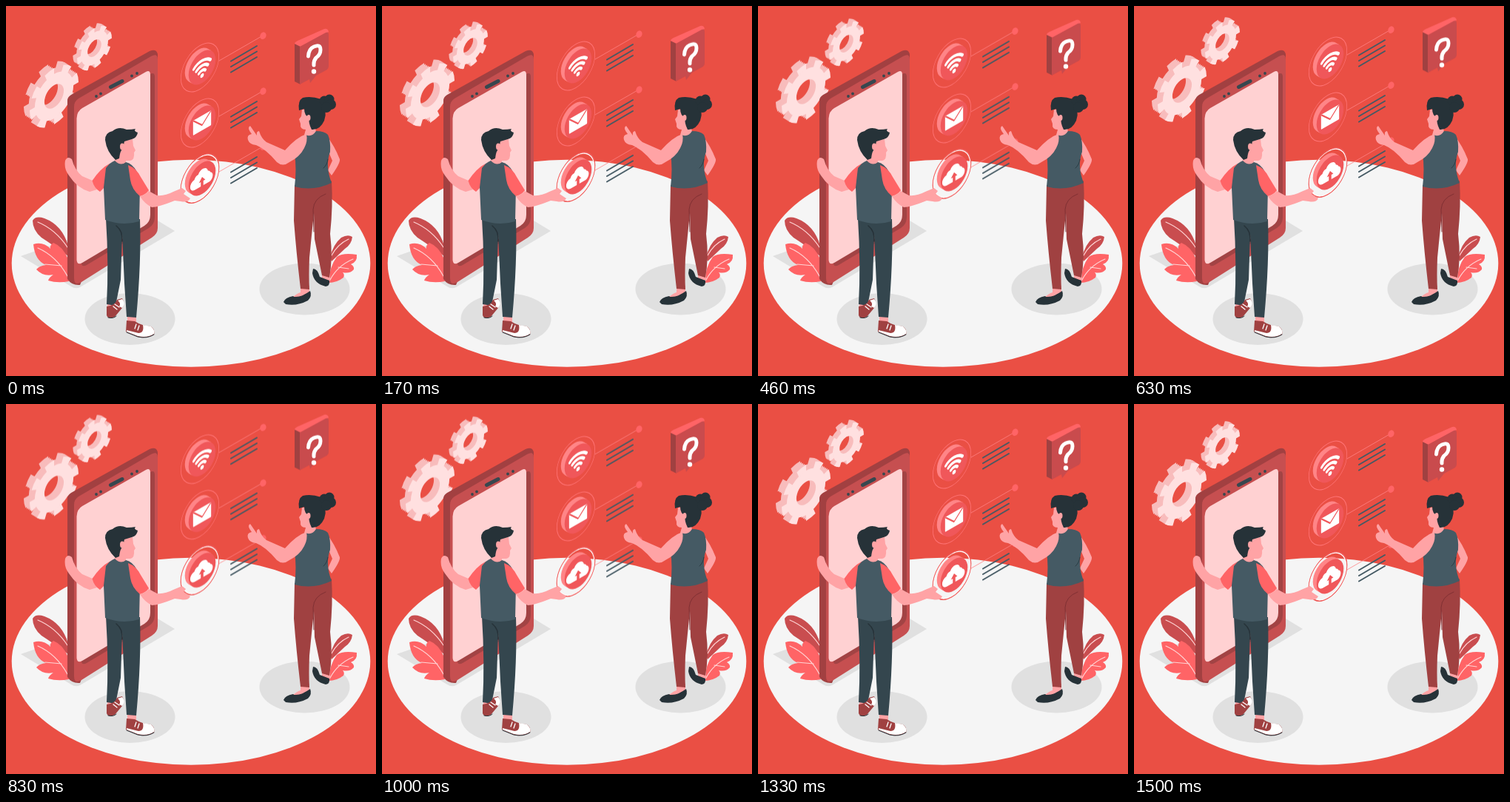
Write an HTML page without scripts that moves like this. It is 500x500 px and loops after 1.54 s.

```html
<!DOCTYPE html>
<html lang="en">
<head>
<meta charset="utf-8">
<title>Isometric app scene</title>
<style>
  html, body { margin: 0; width: 100%; height: 100%; overflow: hidden; background: #ea4f44; }
  svg { display: block; width: 100vw; height: 100vh; }

  .float { --rise: -8.7px; animation: float 1540ms linear infinite; }
  .bubble { --rise: -17px; }
  .mark { --rise: -9.5px; }
  @keyframes float {
    0%, 97.4%, 100% { transform: translateY(0); }
    11% { transform: translateY(calc(var(--rise) * .24)); }
    30% { transform: translateY(calc(var(--rise) * .72)); }
    35% { transform: translateY(calc(var(--rise) * .83)); }
    44% { transform: translateY(calc(var(--rise) * .97)); }
    49% { transform: translateY(var(--rise)); }
    54% { transform: translateY(calc(var(--rise) * .97)); }
    73.4% { transform: translateY(calc(var(--rise) * .53)); }
    86.4% { transform: translateY(calc(var(--rise) * .23)); }
  }

  .skin { fill: #ffa3a5; }
  .dark { fill: #263238; }
  .slate { fill: #455a64; }
  .coral { fill: #ff6466; }
  .maroon { fill: #a04141; }
  .leaf { fill: #c94d4f; }
  .white { fill: #fff; }
  .shadow { fill: #e0e0e0; }
  .line { fill: none; stroke-linecap: round; stroke-linejoin: round; }
  .glyph { stroke: #fff; stroke-width: 4; }
  .vein { stroke: #ffd4d4; stroke-width: 1.2; }
  .side { color: #f8bcbc; }
  .face { color: #ffe0e0; }
</style>
</head>
<body>
<svg viewBox="0 0 500 500">
  <defs>
    <g id="cog" fill="none" stroke="currentColor" transform="matrix(.87 -.5 0 1 0 0) rotate(22.5)">
      <circle r="22.5" stroke-width="15"/>
      <circle r="33.5" stroke-width="9" pathLength="16" stroke-dasharray="1 1"/>
    </g>
    <g id="gear">
      <g class="side">
        <use href="#cog" x="-8" y="-5"/>
        <use href="#cog" x="-6" y="-3.7"/>
        <use href="#cog" x="-4" y="-2.5"/>
        <use href="#cog" x="-2" y="-1.2"/>
      </g>
      <use href="#cog" class="face"/>
    </g>
    <g id="badge">
      <path class="line" stroke="#ff8587" stroke-width=".8" d="M288 74L347 40"/>
      <ellipse class="coral" cx="347.500" cy="40" rx="4" ry="5" transform="rotate(25 347 40)"/>
      <path class="line" stroke="#455a64" stroke-width="2" d="M304 74.500l35-20.500m-35 28l35-20.500m-35 28l35-20.500"/>
      <circle r="29.500" fill="none" stroke="#ff7476" stroke-width=".9" transform="matrix(.87 -.5 0 1 262 83)"/>
      <g fill="#ff8587">
        <circle r="21" transform="matrix(.87 -.5 0 1 260 80)"/>
        <circle r="21" transform="matrix(.87 -.5 0 1 262.500 81.500)"/>
      </g>
      <circle r="21" fill="#f0575a" transform="matrix(.87 -.5 0 1 265 83)"/>
    </g>
    <path id="screen" d="M95.500 152Q96 142 103 138L189 89Q195 86 195 93V282Q195 292 187 297L103 347Q96 351 95.500 343Z"/>
  </defs>

  <rect width="500" height="500" fill="#ea4f44"/>
  <ellipse cx="250" cy="347.800" rx="242.300" ry="140" fill="#f5f5f5"/>
  <path class="shadow" d="M20 338L83 316L205 290L228 304L100 380Q94 383 88 379Z"/>
  <ellipse class="shadow" cx="167.500" cy="423" rx="61" ry="35"/>
  <ellipse class="shadow" cx="403.500" cy="382.500" rx="61" ry="35"/>

  <g class="float">
    <use href="#gear" transform="translate(65 122)"/>
    <use href="#gear" transform="translate(119.500 57) scale(.71)"/>
  </g>

  <!-- Plants -->
  <path class="leaf" d="M84 338Q62 322 48 313Q36 303 36 290Q40 283 52 287Q76 296 84 324Z"/>
  <path class="coral" d="M84 362L85 372Q70 375 57 371Q58 367 64 363Q50 366 41 356Q45 351 54 350Q39 344 37 322Q50 318 60 328Q59 323 64 320Q77 325 84 342Z"/>
  <path class="line vein" d="M43 292Q67 302 83 326M43 327Q68 338 83 365M53 349L75 351"/>
  <path class="leaf" d="M438 340Q442 322 453 313Q462 308 468 312Q467 322 458 328L440 345Z"/>
  <path class="coral" d="M436 374Q437 352 447 339Q455 333 474 336Q475 346 466 349Q471 352 470 356Q465 362 455 360Q458 363 456 367Q447 374 436 374Z"/>
  <path class="line vein" d="M440 337Q448 322 463 315M438 370Q448 351 469 342M449 353L463 355"/>

  <!-- Phone -->
  <path fill="#a24041" d="M83 128Q83 123 88 120L194 61Q203 57 205 65V110L100 377Q89 378 83 369Z"/>
  <path fill="#c64f50" d="M92 136Q92 129 98 125L196 68Q205 63 205 72V300Q205 308 197 313L102 373Q92 379 92 368Z"/>
  <use href="#screen" x="6" y="3" fill="#a24344"/>
  <use href="#screen" fill="#ffd1d2"/>
  <path class="line" stroke="#37474f" stroke-width="5" d="M141.500 109.500L157 101.500"/>
  <g fill="#37474f">
    <circle cx="122" cy="122" r="1.900"/><circle cx="128" cy="118.500" r="1.900"/>
    <circle cx="170" cy="94.500" r="1.900"/><circle cx="177" cy="91" r="1.900"/>
  </g>

  <!-- Floating badges -->
  <g class="float">
    <use href="#badge"/>
    <g transform="matrix(.87 -.5 0 1 265 83)">
      <path class="line glyph" d="M-13-4A19 19 0 0 1 13-4M-9 1A13 13 0 0 1 9 1M-5 6A7 7 0 0 1 5 6"/>
      <circle class="white" cy="11" r="2.800"/>
    </g>
    <use href="#badge" y="75"/>
    <g transform="matrix(.87 -.5 0 1 265 158)">
      <rect class="white" x="-14" y="-10" width="28" height="20" rx="1"/>
      <path class="line" stroke="#f0575a" stroke-width="1.800" d="M-13-9L0 3L13-9"/>
    </g>
    <use href="#badge" y="150"/>
    <g fill="none" transform="matrix(.87 -.5 0 1 262 233)">
      <circle r="28.500" stroke="#fff" stroke-width="1.200"/>
      <circle r="29.700" stroke="#ee5a58" stroke-width="1.200"/>
    </g>
    <g transform="matrix(.87 -.5 0 1 265 233)">
      <path class="white" d="M-11 10A7 7 0 0 1-12-4A6 6 0 0 1-6-8A8 8 0 0 1 9-6A6 6 0 0 1 13-2A6.500 6.500 0 0 1 12 10Z"/>
      <path fill="#f0575a" d="M0-2L5 4H2V11H-2V4H-5Z"/>
    </g>
  </g>

  <g class="float bubble">
    <path class="maroon" d="M390 51L398 54V106L390 102Z"/>
    <path class="coral" d="M390 51Q390 49 394 47L430 31Q435 30 436 35L398 55Z"/>
    <path fill="#c94b4d" d="M397 55L432 36Q436 34 436 39V81Q436 85 432 87L419 94L411 104L410 99L397 106Z"/>
  </g>
  <g class="float mark">
    <path class="line" stroke="#fff" stroke-width="5" d="M408.500 68Q409 58 416 55Q425 51 425 59Q425 66 419 70Q415.500 74 416 80"/>
    <circle class="white" cx="416" cy="88.500" r="3.200"/>
  </g>

  <!-- Man -->
  <path class="skin" d="M117 236L103 230Q93 222 89 207Q83 202 80 209Q78 220 85 229Q96 246 113 251L123 248ZM137 398H148V412H137ZM164 418H176V430H164Z"/>
  <path class="coral" d="M140 213Q128 219 116.500 236Q119 246 127 251L137 241Z"/>
  <path fill="#34464e" d="M135 287L181 288Q183 345 176 421L163 420L160 375L157 308L155 370L148 405L136 403Q139 350 135 287Z"/>
  <path class="line" stroke="#263238" stroke-width="1.500" d="M157 318Q158 304 149 297"/>
  <path class="skin" d="M153 183L171 180L172 189L175 195L173 198Q174 208 168 209L162 209V216Q152 219 146 212Z"/>
  <path class="slate" d="M135 219Q141 211 147 209Q155 217 162 211Q171 213 177 224L181 245L180 291Q158 298 134 289L132 245Z"/>
  <path class="coral" d="M165 215Q176 219 182 231L193 249Q189 255 181 257Q170 248 168 235Z"/>
  <path class="skin" d="M181 257Q189 255 193 250L204 256Q215 257 226 251L238 246L243 250L240 254L249 260Q246 266 236 264L228 263Q205 272 197 272Q187 267 181 257Z"/>
  <path class="dark" d="M148 208Q136 197 134 181Q134 171 144 169Q152 162 163 167Q170 167 175 166Q172 169 178 171Q177 178 170 180L160 183L158 192Q154 196 153 206Z"/>
  <ellipse class="skin" cx="157" cy="190" rx="3" ry="4.500"/>
  <path class="maroon" d="M136 406Q147 405 150 397L157 395Q161 402 157 408L147 420Q138 424 136 418ZM163 425L174 426Q183 432 196 433Q202 438 200 444Q190 450 178 447L162 440Z"/>
  <path class="white" d="M151 398L157 396Q162 402 157 408L153 406Q156 402 151 398ZM185 431L196 433Q202 439 200 443Q191 449 178 446L163 440V438L179 442Q187 442 185 431Z"/>
  <path class="line" stroke="#263238" stroke-width="1" d="M163 441L178 447Q191 450 200 444M138 421Q145 423 149 419"/>
  <path class="line" stroke="#fff" stroke-width="1.300" d="M147 403l6 4m-8-1l5 4M176 430l-2 6m6-4l-2 6"/>

  <!-- Woman -->
  <path class="skin" d="M433 175Q444 189 451 207Q452 212 440 229L435 222L441 209L435 195ZM398 378H410V393L398 394ZM427 360H438V372L427 371Z"/>
  <path class="maroon" d="M390 242Q415 251 440 236Q442 270 438 308Q442 340 437 367L427 364L417 315L416 280Q414 300 410 340Q409 365 410 383L398 382Q392 330 389 290Z"/>
  <path class="line" stroke="#803033" stroke-width="1" d="M416 305L415 275Q416 260 432 254"/>
  <path class="dark" d="M375 400Q377 394 388 392Q399 394 411 385Q414 392 408 398Q393 406 378 403ZM415 355Q421 355 424 366L437 371Q438 378 432 379Q416 375 414 361Z"/>
  <path class="skin" d="M388 393Q394 388 398 387L409 384Q402 394 388 393Z"/>
  <path class="skin" d="M400 140L413 139L418 165L420 175L402 178L405 167Q397 167 398 159L396 153L399 149Z"/>
  <path class="slate" d="M405 174Q413 178 419 169Q430 169 435 174Q439 183 438 197Q431 216 440 239Q415 251 390 244Q393 220 390 200Q393 181 405 174Z"/>
  <path class="skin" d="M406 173Q393 177 377 195L352 184Q345 179 342 169Q338 169 339 175L330 162Q325 164 332 173Q325 174 327 181Q329 187 338 188Q351 193 366 211Q374 218 383 211Q397 204 403 192Q408 183 406 173Z"/>
  <path class="line" stroke="#2c3d44" stroke-width="1" d="M435 207Q434 215 429 219"/>
  <g class="dark">
    <path d="M396 141Q394 128 401 124Q412 121 426 126Q435 140 430 155Q424 168 413 167Q408 157 410 150Q403 149 403 139Z"/>
    <circle cx="430" cy="128" r="6.500"/><circle cx="437" cy="126" r="6.500"/>
    <circle cx="439" cy="133" r="7"/><circle cx="433" cy="137" r="7"/>
  </g>
  <ellipse class="skin" cx="409" cy="151" rx="2.500" ry="4"/>
</svg>
</body>
</html>
```
